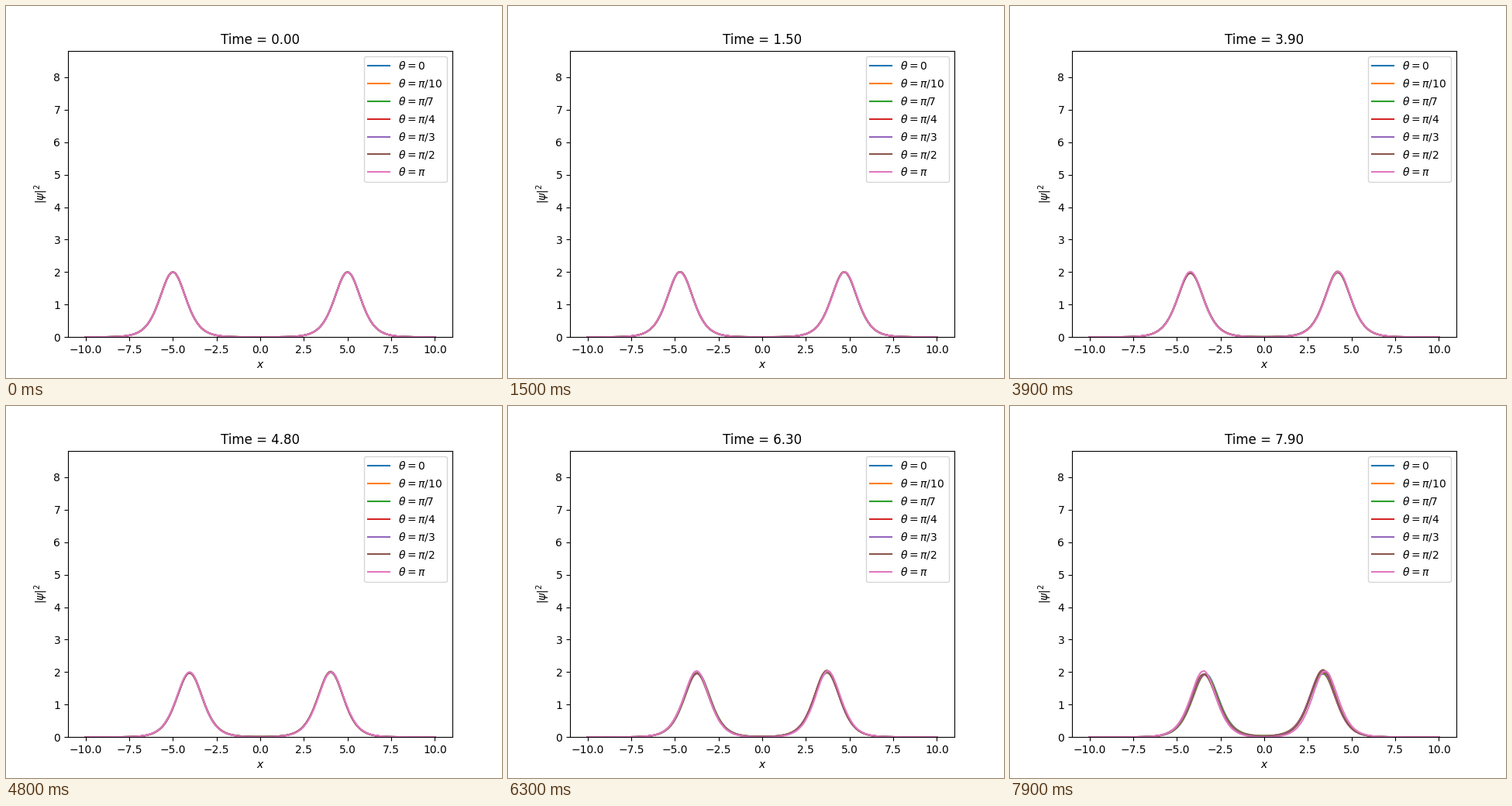
These frames come from a looping animation (640 px wide and 480 px high, 8000 ms). A matplotlib script:

```python
import numpy as np
import matplotlib.pyplot as plt
from matplotlib.animation import FuncAnimation

FRAMES, INTERVAL = 80, 100
FRAME_DT, SUBSTEPS = 0.1, 50
HALF, N = 10.0, 256
START, SPEED = 5.0, 0.2

PHASES = [
    (r"$\theta=0$", 0.0),
    (r"$\theta=\pi/10$", np.pi / 10),
    (r"$\theta=\pi/7$", np.pi / 7),
    (r"$\theta=\pi/4$", np.pi / 4),
    (r"$\theta=\pi/3$", np.pi / 3),
    (r"$\theta=\pi/2$", np.pi / 2),
    (r"$\theta=\pi$", np.pi),
]

x = np.linspace(-HALF, HALF, N + 1)


def soliton(x, center, speed):
    return np.sqrt(2) / np.cosh(x - center) * np.exp(0.5j * speed * (x - center))


def evolve():
    """Densities of i u_t + u_xx + |u|^2 u = 0 by split steps, for all phases."""
    grid = x[:-1]
    theta = np.array([t for _, t in PHASES])[:, None]
    u = soliton(grid, -START, SPEED) + np.exp(1j * theta) * soliton(grid, START, -SPEED)
    k = 2 * np.pi * np.fft.fftfreq(N, 2 * HALF / N)
    dt = FRAME_DT / SUBSTEPS
    drift = np.exp(-1j * k**2 * dt)
    out = []
    for _ in range(FRAMES):
        density = np.abs(u) ** 2
        out.append(np.hstack([density, density[:, :1]]))
        for _ in range(SUBSTEPS):
            u = u * np.exp(0.5j * dt * np.abs(u) ** 2)
            u = np.fft.ifft(drift * np.fft.fft(u, axis=1), axis=1)
            u = u * np.exp(0.5j * dt * np.abs(u) ** 2)
    return out


history = evolve()

fig, ax = plt.subplots(figsize=(6.4, 4.8), dpi=100)
lines = [ax.plot(x, y, label=label)[0] for (label, _), y in zip(PHASES, history[0])]
ax.set_xlim(-1.1 * HALF, 1.1 * HALF)
ax.set_ylim(0, 8.82)
ax.set_xlabel("$x$")
ax.set_ylabel(r"$|\psi|^2$")
ax.legend(loc="upper right")
title = ax.set_title("Time = 0.00")


def update(i):
    for line, y in zip(lines, history[i]):
        line.set_ydata(y)
    title.set_text(f"Time = {i * FRAME_DT:.2f}")
    return [*lines, title]


anim = FuncAnimation(fig, update, frames=FRAMES, interval=INTERVAL, repeat=True)
plt.show()
```
